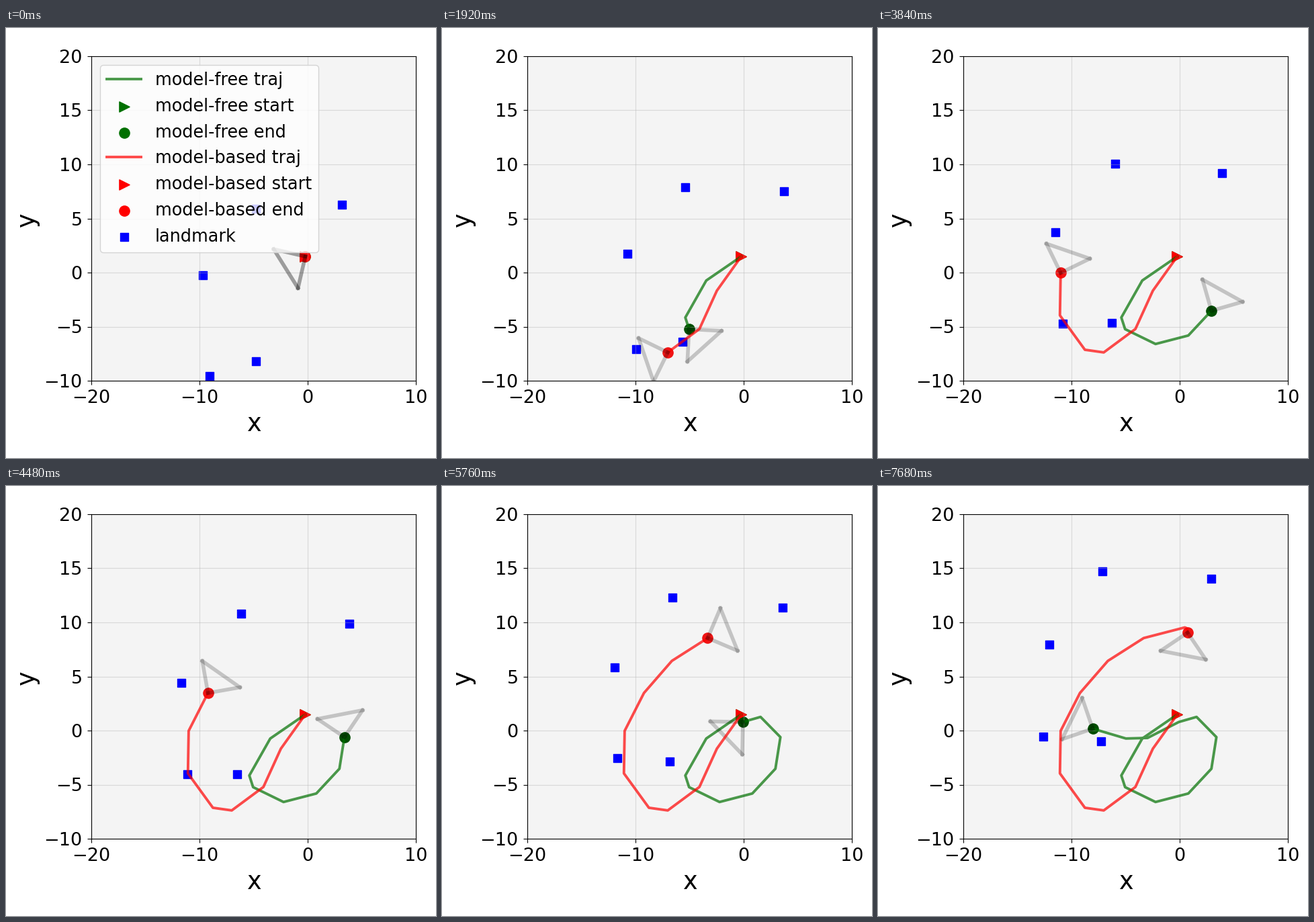
Recreate the animation shown at these times as a matplotlib script. Size 640 by 640 pixels, loop 8000 ms.

```python
import numpy as np
import matplotlib.pyplot as plt
from matplotlib.animation import FuncAnimation

plt.rcParams["font.family"] = "DejaVu Sans"

SIZE, DPI = 640, 100
INTERVAL, FRAMES = 320, 25
FRAMES_PER_STEP = 2
STEPS = FRAMES // FRAMES_PER_STEP
START, START_HEADING = (-0.22, 1.49), 212
VIEW_RANGE, HALF_VIEW = 3.0, np.pi / 4

# Where each landmark is at the beginning, halfway and at the end
LANDMARKS = np.array([
    [(-4.78, 5.90), (-5.98, 10.05), (-7.17, 14.69)],
    [(3.14, 6.27), (3.90, 9.20), (2.89, 14.04)],
    [(-9.69, -0.22), (-11.50, 3.75), (-12.02, 7.95)],
    [(-4.81, -8.17), (-6.30, -4.65), (-7.24, -1.02)],
    [(-9.04, -9.57), (-10.80, -4.75), (-12.61, -0.56)]])


def drive(speeds, turns):
    """Unicycle motion: each step goes along the mean of the old and new heading."""
    headings = np.radians(START_HEADING + np.cumsum([0, *turns]))
    course = (headings[:-1] + headings[1:]) / 2
    moves = np.array(speeds) * [np.cos(course), np.sin(course)]
    return np.vstack([START, START + np.cumsum(moves.T, axis=0)]), headings


def landmark_positions(t):
    """Quadratic drift through the three key points, t from 0 to 1."""
    weights = [(1 - t) * (1 - 2 * t), 4 * t * (1 - t), t * (2 * t - 1)]
    return np.tensordot(LANDMARKS, weights, axes=(1, 0))


class Robot:
    def __init__(self, name, color, end_color, speeds, turns):
        self.path, self.headings = drive(speeds, turns)
        self.colors = color, end_color
        self.traj, = ax.plot([], [], color=color, lw=2.8, alpha=0.7, label=f"{name} traj")
        ax.scatter(*START, s=120, c=color, marker=">", label=f"{name} start")
        self.end = ax.scatter(*START, s=120, c=color, label=f"{name} end")
        self.view = [ax.plot([], [], color="black", lw=4, alpha=0.2)[0] for _ in range(3)]

    def show(self, step):
        pos, heading = self.path[step], self.headings[step]
        self.traj.set_data(*self.path[:step + 1].T)
        self.end.set_offsets([pos])
        self.end.set_color(self.colors[step > 0])
        left, right = (pos + VIEW_RANGE * np.array([np.cos(a), np.sin(a)])
                       for a in (heading + HALF_VIEW, heading - HALF_VIEW))
        for line, ends in zip(self.view, [(pos, left), (pos, right), (left, right)]):
            line.set_data(*np.transpose(ends))


fig = plt.figure(figsize=(SIZE / DPI, SIZE / DPI), dpi=DPI, facecolor="white")
ax = fig.add_axes([127 / SIZE, 115 / SIZE, 483 / SIZE, 483 / SIZE])
ax.set(xlim=(-20, 10), ylim=(-10, 20), facecolor="#f4f4f4",
       xticks=range(-20, 11, 10), yticks=range(-10, 21, 5))
ax.grid(color="#b0b0b0", alpha=0.4)
ax.tick_params(labelsize=19.5, length=4.2, pad=5.4)
label_style = dict(fontsize=26.3, ha="center", va="baseline", rotation_mode="anchor")
fig.text(369.5 / SIZE, 40 / SIZE, "x", **label_style)
fig.text(41.5 / SIZE, 355 / SIZE, "y", rotation=90, **label_style)

robots = [
    Robot("model-free", "#007000", "#004d00",
          speeds=[3.93] * 2 + [1.13] + [3.13] * 3 + [2.96, 2.62, 1.7, 3.25, 2, 3.2],
          turns=[5, 47, 48, 44, 37, 28, 40, 67, 56, -34, -17, -19]),
    Robot("model-based", "red", "#f01414",
          speeds=[3.89] * 2 + [3.64, 1.76] + [3.93] * 6 + [0.17, 0.43],
          turns=[45, -23, -35, -54, -38, -36, -16, -12, -21, -15, -60, -48])]
landmarks = ax.scatter([], [], s=86, c="blue", marker="s", label="landmark")
legend = ax.legend(loc="upper left", fontsize=18.4)


def update(frame):
    step = frame // FRAMES_PER_STEP
    for robot in robots:
        robot.show(step)
    landmarks.set_offsets(landmark_positions(step / STEPS))
    legend.set_visible(step == 0)
    return []


anim = FuncAnimation(fig, update, frames=FRAMES, interval=INTERVAL, repeat=True, repeat_delay=0)
plt.show()
```
